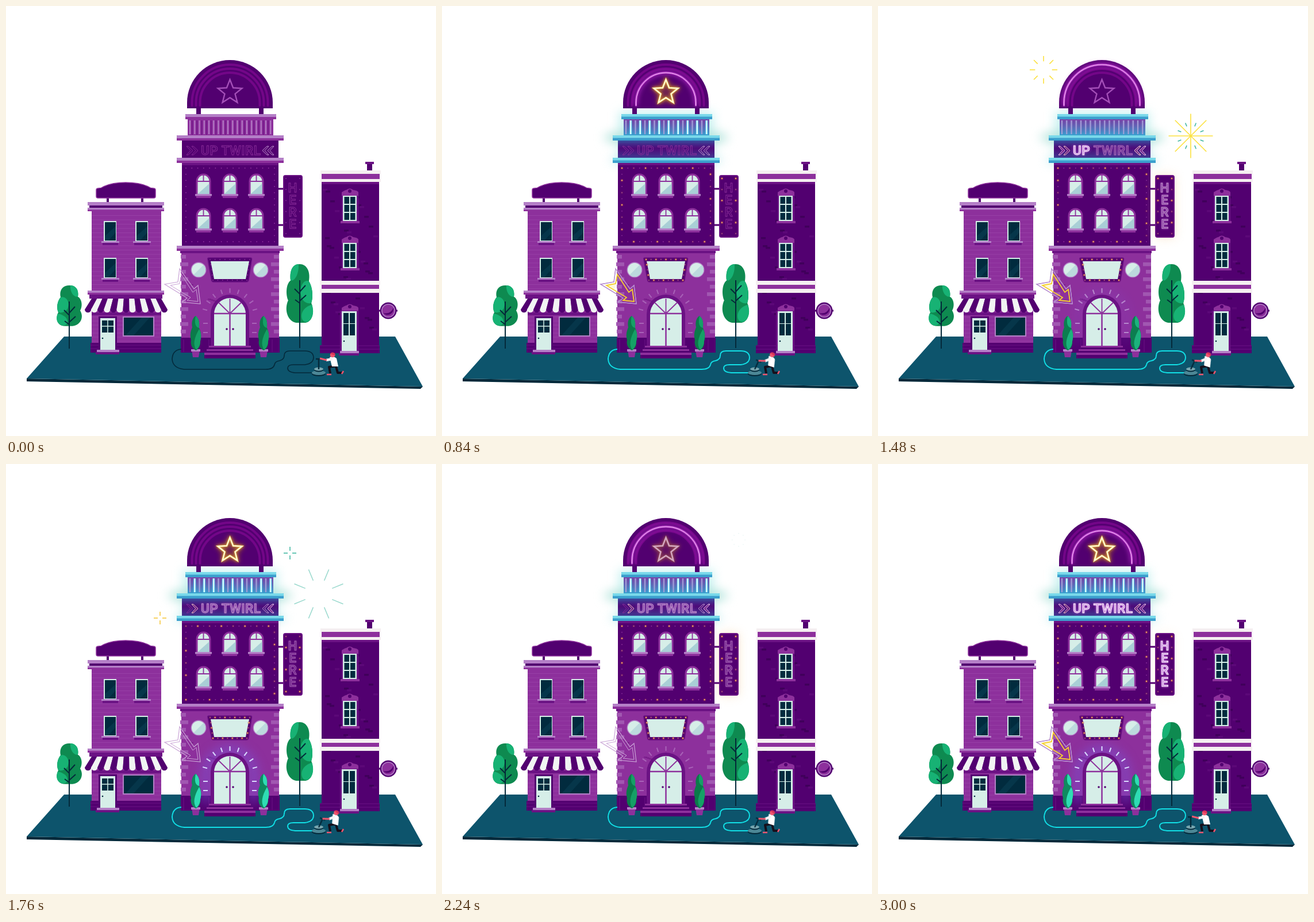
These frames come from a looping animation (748 by 748 pixels, 3040 ms). An HTML page:

```html
<!DOCTYPE html>
<html lang="en">
<head>
<meta charset="utf-8">
<title>Neon street</title>
<style>
html, body { margin: 0; width: 100%; height: 100%; overflow: hidden; background: #fff; }
svg { display: block; width: 100vw; height: 100vh; }
text { font: 500 22.5px Roboto, "Open Sans", sans-serif; letter-spacing: .5px; text-anchor: middle; fill: none; stroke: #8d309c; stroke-width: .9; }
.lit text { fill: #c98ade; stroke: #fff; stroke-width: 1; }
.pink { filter: drop-shadow(0 0 2px #b04fd0); }
.gold { filter: drop-shadow(0 0 2px #e0a83a) drop-shadow(0 0 4px #a8602a); }
.blur { filter: blur(9px); }
.soft { filter: blur(4px); }
.torso { transform-origin: 572px 627px; }
.arm { transform-origin: 568px 614px; }
.stick { transform-origin: 544px 632px; }
</style>
</head>
<body>
<svg id="stage" viewBox="0 0 748 748"></svg>
<script>
const LOOP = 3040;
const dark = '#520070', mid = '#6b1284', plum = '#8d309c', lilac = '#b47fc7',
      pale = '#d6eee8', cream = '#f5eff1', navy = '#012b3e', cyan = '#12dfe6', yellow = '#fbe13c', teal = '#43b8a3';

let css = '';
// Keyframes from [ms, value] stops; the loop cuts hard at its end.
function keys(name, prop, stops, ease = 'linear') {
  const all = [[0, stops[0][1]], ...stops, [LOOP, stops.at(-1)[1]]];
  const body = all.map(([t, v]) => `${(t / LOOP * 100).toFixed(3)}%{${prop}:${v}}`).join('');
  css += `@keyframes ${name}{${body}} .${name}{animation:${name} ${LOOP}ms ${ease} infinite}`;
}
const fade = (name, ...stops) => keys(name, 'opacity', stops);
const blink = (name, ...stops) => keys(name, 'opacity', stops, 'step-end');

const rep = (n, f) => Array.from({ length: n }, (_, i) => f(i)).join('');
const rect = (x, y, w, h, fill, more = '') => `<rect x="${x}" y="${y}" width="${w}" height="${h}" fill="${fill}" ${more}/>`;
const path = (d, fill, more = '') => `<path d="${d}" fill="${fill}" ${more}/>`;
const line = (d, stroke, w = 1, more = '') => `<path d="${d}" fill="none" stroke="${stroke}" stroke-width="${w}" ${more}/>`;
const dot = (x, y, r, fill, more = '') => `<circle cx="${x}" cy="${y}" r="${r}" fill="${fill}" ${more}/>`;
const oval = (x, y, rx, ry, fill) => `<ellipse cx="${x}" cy="${y}" rx="${rx}" ry="${ry}" fill="${fill}"/>`;
const g = (cls, inner, more = '') => `<g class="${cls}" ${more}>${inner}</g>`;
const move = (x, y, inner) => g('', inner, `transform="translate(${x} ${y})"`);
const ledge = (x, y, w, h) => rect(x, y, w, h, plum) + rect(x, y, w, h * .55, lilac, 'rx="1"');

// Timeline
fade('cyanOn', [640, 0], [760, 1]);
keys('cableOn', 'stroke-dashoffset', [[420, 1], [680, 0]]);
blink('bulbA', [680, 1], [1000, .35], [1280, 1], [1640, .35], [2120, 1]);
blink('bulbB', [680, .25], [1000, 1], [1280, .3], [1640, 1], [2120, .35], [2680, .3]);
fade('bulbs', [640, 0], [720, 1]);
blink('tubeA', [720, 1], [1080, 0], [1640, 1], [2000, 0], [2160, 1], [2400, 0], [2480, 1]);
blink('tubeB', [720, 0], [1080, 1], [1360, 0], [2000, 1], [2160, 0]);
fade('starOn', [640, 0], [740, 1], [1200, 1], [1320, 0], [1600, 0], [1700, 1], [1960, 1], [2060, 0], [2160, 0], [2320, 1], [2680, 1], [2740, .2], [2820, .2], [2900, 1]);
[760, 1030, 1300].forEach((t, i) =>
  fade('arc' + i, ...[0, 1080, 2160].filter(d => t + d < 3000).flatMap(d =>
    [[t + d, 0], [t + d + 60, 1], [t + d + 250, 1], [t + d + 310, 0]].filter(s => s[0] < LOOP))));
blink('arrowOn', [0, 0], [720, 1], [1040, 0], [1280, 1], [1640, 0], [2360, 1], [2720, 0], [2880, 1]);
fade('doorOn', [1380, 0], [1480, .3], [1600, 1], [1820, 1], [2080, 0], [2420, 0], [2520, .2], [2700, 1]);
fade('word0', [1280, 0], [1400, 1], [1520, 1], [1600, .5], [2360, .5], [2440, 1]);
fade('word1', [1440, 0], [1480, .3], [1600, .5], [2360, .5], [2440, 1]);
fade('hereOn', [1400, 0], [1480, .5], [1640, .5], [1720, .25], [2360, .3], [2460, 1]);
fade('hereGlow', [1280, 0], [1400, 1], [1600, 1], [1680, 0], [2100, 0], [2200, 1], [2640, 1], [2720, .4]);
blink('chevA', [0, 0], [1320, 1], [1640, 0], [2400, 1]);
blink('chevB', [0, 0], [1400, .9]);
const pose = (name, down, up) => keys(name, 'transform', [[360, up], [480, down], [2680, down], [2840, up]], 'ease-in-out');
pose('torso', 'rotate(18deg)', 'rotate(0deg)');
pose('arm', 'rotate(-30deg)', 'rotate(0deg)');
pose('stick', 'rotate(25deg) scaleY(.88)', 'rotate(0deg) scaleY(1)');

// Fireworks: each ray grows outwards, then its tail runs off.
let bursts = 0;
function burst(x, y, r0, r1, n, turn, color, stops, fadeFrom, fadeTo) {
  const id = bursts++;
  keys('ray' + id, 'stroke-dashoffset', stops);
  fade('out' + id, [fadeFrom, 1], [fadeTo, 0]);
  return move(x, y, g('out' + id, rep(n, i =>
    line(`M${r0} 0H${r1}`, color, 1.6, `class="ray${id}" pathLength="1" stroke-dasharray="1 2" stroke-dashoffset="1" transform="rotate(${turn + i * 360 / n})"`))));
}
function fireworks() {
  return burst(288, 111, 2, 24, 8, 0, yellow, [[1160, 1], [1320, 0], [1600, -1]], 1480, 1600)
    + burst(544, 226, 0, 38.5, 8, 0, yellow, [[1240, 1], [1460, 0], [1500, 0], [1700, -1]], 1580, 1720)
    + burst(544, 226, 18, 46, 8, 22.5, teal, [[1400, 1], [1480, .78], [1660, 0], [1760, -.25], [1880, -1]], 1640, 1900)
    + burst(494, 155, 3, 11, 4, 0, teal, [[1640, 1], [1740, 0], [1920, -1]], 1800, 1940)
    + burst(268, 268, 3, 11, 4, 0, '#f5c93f', [[1640, 1], [1740, 0], [1920, -1]], 1800, 1940)
    + burst(516, 132, 5, 12, 8, 0, teal, [[1880, 1], [2040, 0], [2300, -1]], 2080, 2260);
}

function ground() {
  return path('M36 648L725 662L721 666L36 653Z', '#04293a') + path('M101 575H677L725 662L36 648Z', '#0d546c');
}

function tree(x, y, sx, sy, foot) {
  const crown = 'M0 0C12 0 17 8 15 19C23 23 23 36 19 42C26 53 20 66 6 68H-6C-20 69-25 57-19 45C-23 37-20 25-15 20C-18 8-11 0 0 0Z';
  return g('', path(crown, '#0e8a50')
    + path('M-15 20C-7 17 1 26-2 36C-3 43-13 47-19 45C-23 37-20 25-15 20ZM-20 47C-10 49 0 55-4 64Q-8 69-15 66C-23 62-23 53-20 47ZM2 0C12 0 17 8 15 19C7 20 1 10 2 0Z', '#17b274'),
    `transform="translate(${x} ${y}) scale(${sx} ${sy})"`)
    + line(`M${x} ${y + 28}V${foot}M${x} ${y + 52}l-9-9M${x} ${y + 48}l10-11M${x} ${y + 64}l11-10M${x} ${y + 68}l-8-6`, '#04293a', 2);
}

function sash(x, y, w, h) {
  return rect(x, y, w, h, pale) + rect(x + 2, y + 2, w - 3, h - 3, navy)
    + path(`M${x + 2} ${y + h - 9}L${x + w - 1} ${y + 9}V${y + 20}L${x + 8} ${y + h - 1}H${x + 2}Z`, '#06364a');
}

function shop() {
  const win = (x, y) => sash(x, y, 22, 35) + rect(x - 4, y + 35, 31, 3, lilac) + rect(x - 2, y + 38, 27, 4, mid);
  const stripe = i => {
    const a = 149 + i * 121 / 13, b = a + 121 / 13, c = 137 + i * 144 / 13, d = c + 144 / 13;
    return path(`M${a} 509H${b}L${d} 528A5.54 5.5 0 0 1 ${c} 528Z`, i % 2 ? '#f1f4f3' : dark);
  };
  return rect(149, 350, 121, 253, plum)
    + rep(18, i => line(`M149 ${364.5 + i * 7.5}H270`, '#9a43a9', .8))
    + rect(142, 341, 133, 6, lilac) + rect(145, 347, 127, 4, dark) + ledge(142, 351, 133, 6)
    + rect(175, 333, 4, 8, dark) + rect(235, 333, 4, 8, dark)
    + path('M160 334Q157 334 157 331V320Q157 317 161 317Q166 317 170 314Q185 307 208 307Q232 307 247 314Q251 317 256 317Q260 317 260 320V331Q260 334 257 334Z', dark, `stroke="${plum}" stroke-width="1.5"`)
    + rep(4, i => win(170 + i % 2 * 55, i < 2 ? 374 : 438))
    + ledge(142, 495, 133, 7) + rect(145, 502, 127, 7, mid)
    + rep(7, i => line(`M149 ${541 + i * 7}H270`, '#9a43a9', .8))
    + rect(149, 533, 121, 5, mid) + rep(13, stripe)
    + rect(147, 586, 123, 17, dark) + line('M147 590H270M147 596H270', mid)
    + rect(161, 540, 32, 60, dark) + rect(164, 543, 26, 56, pale)
    + rect(167, 547, 20, 21, navy) + line('M177 547V568M167 557H187', pale, 1.5) + dot(168, 578, 1.3, navy)
    + rect(158, 598, 39, 4, lilac) + rect(156, 602, 41, 4, mid)
    + rect(203, 540, 55, 35, lilac) + rect(205, 542, 51, 31, navy) + path('M208 573L236 542H250L222 573Z', '#06364a');
}

function rightHouse() {
  const crest = y => path(`M584 ${y + 12}V${y + 6}Q590 ${y + 2} 592 ${y + 2}Q598 ${y - 3} 604 ${y + 2}Q612 ${y + 3} 613 ${y + 6}V${y + 12}Z`, plum) + dot(598, y + 4, 3, dark);
  const win = y => crest(y - 12) + rect(584, y, 29, 45, mid) + rect(586, y, 24, 44, pale) + rect(588.5, y + 2, 19, 40, navy)
    + line(`M598 ${y}V${y + 44}M587 ${y + 15}H610M587 ${y + 29}H610`, pale, 2) + rect(582, y + 44, 33, 4, plum);
  const brick = i => rect(551 + i * 37 % 89, 318 + Math.floor(i * 71 % 257), 8, 3.5, i % 3 ? '#40005b' : '#5c0878');
  return rect(628, 273, 9, 14, dark) + rect(625, 271, 15, 4, mid)
    + rect(549, 290, 100, 314, dark) + rep(44, brick)
    + rect(547, 286, 105, 6, cream) + rect(549, 292, 101, 9, plum) + rect(547, 301, 105, 5, cream) + rect(549, 306, 100, 4, mid)
    + win(330) + win(412)
    + rect(546, 478, 105, 7, cream) + rect(549, 485, 100, 7, plum) + rect(546, 492, 105, 7, cream)
    + rect(546, 590, 104, 14, dark) + line('M546 591H650M546 597H650', mid, 1.2)
    + crest(519) + rect(581, 530, 32, 73, mid) + rect(584, 531, 26, 72, pale) + rect(587, 534, 20, 18, navy) + rect(587, 553, 20, 20, navy)
    + line('M597 532V574', pale, 2) + dot(588, 583, 1.3, navy) + rect(581, 600, 33, 4, lilac) + rect(579, 604, 35, 4, mid)
    + line('M648 530H681', dark, 3) + dot(665, 530, 14.5, dark) + dot(665, 530, 12, lilac) + dot(665, 530, 10.5, plum)
    + path('M656 534A10.5 10.5 0 0 0 674 525Q669 537 656 534Z', dark);
}

const star = [...Array(10)].map((_, i) => {
  const a = (i * 36 - 90) * Math.PI / 180, r = i % 2 ? 9.5 : 22;
  return `${(389.5 + r * Math.cos(a)).toFixed(1)} ${(150 + r * Math.sin(a)).toFixed(1)}`;
}).join('L');

function dome() {
  const arc = i => `M${337.5 - i * 7} 173V168A${52 + i * 7} ${52 + i * 7} 0 0 1 ${441.5 + i * 7} 168V173`;
  return rect(331, 176, 8, 13, dark) + rect(440, 176, 8, 13, dark)
    + path('M315 178V168A74.5 74 0 0 1 464 168V178Z', dark)
    + rep(3, i => line(arc(i), '#730688', 4, 'stroke-linecap="round"'))
    + rep(3, i => g('arc' + i, line(arc(i), '#b52ac8', 5, 'class="soft"') + line(arc(i), '#c653d6', 3, 'stroke-linecap="round"') + line(arc(i), '#efb4f2', 1)))
    + line(`M${star}Z`, '#a44fb8', 2.4)
    + g('starOn', dot(389.5, 150, 18, '#8a4030', 'class="soft" opacity=".4"') + g('gold', line(`M${star}Z`, '#ffe27a', 3) + line(`M${star}Z`, '#fffbe6', 1.6)));
}

function crown() {
  const tube = (i, c, w) => line(`M${320 + i * 8.25} 199V223`, c, w);
  const tops = [[312, 188, 158, 9], [297, 225, 186, 9], [297, 264, 186, 9]];
  return rect(316, 196, 149, 30, plum) + rep(18, i => tube(i, lilac, 2)) + rep(17, i => line(`M${324 + i * 8.25} 199V224`, mid, 1.4))
    + tops.map(t => ledge(...t)).join('') + rect(306, 234, 168, 30, dark)
    + g('cyanOn', rect(316, 197, 149, 28, 'url(#wash)') + rect(306, 234, 168, 30, 'url(#dim)')
      + rep(18, i => tube(i, '#a59fd8', 2))
      + tops.map(([x, y, w, h]) => rect(x, y, w, h, '#3b9fcd') + rect(x, y, w, h * .5, '#79d9ea', 'rx="1"')).join('')
      + g('tubeA', rep(9, i => tube(i * 2 + 1, '#4fd3ee', 4) + tube(i * 2 + 1, '#f2ffff', 2)))
      + g('tubeB', rep(9, i => tube(i * 2, '#4fd3ee', 3) + tube(i * 2, '#e6fbff', 1.5))));
}

function neonSign() {
  const words = [['UP', 354], ['TWIRL', 409]];
  const label = ([s, x]) => `<text x="${x}" y="259">${s}</text>`;
  const chev = (k, c, fill) => path(`M${314 + k * 9} 244h3l8 7.5l-8 7.5h-3l7-7.5Z`, fill, `stroke="${c}" stroke-width=".9"`);
  const side = (off, a, b) => chev(0, off, 'none') + chev(1, off, 'none')
    + g(a, chev(0, '#f3dcf7', '#6b1284')) + g(b, chev(1, '#fff3cf', '#6b1284'));
  return words.map(label).join('') + words.map((w, i) => g(`lit word${i}`, g('pink', label(w)))).join('')
    + side('#8d309c', 'chevA', 'chevB') + g('', side('#cda6da', 'chevB', 'chevA'), 'transform="translate(780 0) scale(-1 1)"');
}

// Bulbs alternate between two blinking sets, with unlit ones between.
function lamps(points, step = 4) {
  const set = k => points.filter((_, i) => i % step === k).map(([x, y]) =>
    dot(x, y, 2.6, '#c8503a', 'opacity=".3"') + dot(x, y, 1.2, '#f0a868')).join('');
  return points.map(([x, y]) => dot(x, y, .9, '#8d309c')).join('') + g('bulbs', g('bulbA', set(0)) + g('bulbB', set(step / 2)));
}
const run = (n, x0, y0, x1, y1) => [...Array(n)].map((_, i) => [x0 + (x1 - x0) * i / n, y0 + (y1 - y0) * i / n]);

function hall() {
  const glass = 'M-11.5 37V12A11.5 12 0 0 1 11.5 12V37Z';
  const win = i => move(343.5 + i % 3 * 46, i < 3 ? 293 : 353,
    path(glass, pale, `stroke="${plum}" stroke-width="3"`) + path('M-10 34L10 16V36H-10Z', '#a9cfd6')
    + line('M-11 12H11M0 1V12', plum, 1.8) + rect(-14.5, 34, 29, 3.5, lilac) + rect(-12.5, 37.5, 25, 3.5, plum));
  return rect(306, 273, 168, 145, dark) + rect(306, 273, 168, 4, mid)
    + lamps([...run(15, 313, 282, 467, 282), ...run(12, 467, 282, 467, 410), ...run(15, 467, 410, 313, 410), ...run(12, 313, 410, 313, 282)])
    + rep(6, win);
}

function sideSign() {
  const letters = [...'HERE'].map((c, i) => `<text x="498.8" y="${323.5 + i * 21.2}">${c}</text>`).join('');
  return g('hereGlow', rect(482, 294, 34, 109, '#f5c98a', 'class="blur" opacity=".4"'))
    + line('M474 318H484M474 381H484', dark, 3)
    + rect(483, 295, 32, 107, dark, `rx="3" stroke="${mid}" stroke-width="2"`)
    + lamps([...run(6, 487, 300, 487, 415), ...run(6, 511, 300, 511, 415)].filter(p => p[1] < 400), 2)
    + letters + g('lit hereOn', g('pink', letters));
}

function entrance() {
  const rays = (c, w) => rep(9, i => line('M0-41V-49', c, w, `transform="translate(389.5 540) rotate(${(i - 4) * 18.7})"`))
    + line('M343 552h8M343 568h8M428 552h8M428 568h8', c, w);
  const leaf = (x, a, b) => path(`M${x} 539C${x + 8} 546 ${x + 6} 555 ${x + 6} 560C${x + 11} 570 ${x + 9} 579 ${x + 8} 583C${x + 9} 592 ${x + 4} 598 ${x} 599C${x - 9} 594 ${x - 9} 586 ${x - 8} 581C${x - 11} 571 ${x - 8} 564 ${x - 6} 559C${x - 8} 549 ${x - 5} 542 ${x} 539Z`, a)
    + path(`M${x} 539C${x + 8} 546 ${x + 6} 555 ${x + 6} 560Q${x - 4} 558 ${x} 539ZM${x + 6} 562C${x + 11} 570 ${x + 9} 579 ${x + 8} 583Q${x + 8} 592 ${x + 1} 598Q${x - 8} 586 ${x + 6} 562Z`, b);
  const pot = x => path(`M${x - 7} 599H${x + 7}L${x + 5} 611H${x - 5}Z`, plum) + rect(x - 8, 597, 16, 4, lilac);
  const round = x => dot(x, 459, 13.5, lilac) + dot(x, 459, 12, pale) + path(`M${x - 8.5} 467.5L${x + 8.5} 450.5A12 12 0 0 1 ${x - 8.5} 467.5Z`, '#bcdadd');
  return rect(305, 425, 170, 178, plum)
    + rep(11, i => rect(304 - i % 2, 433 + i * 13, 9 + i % 2 * 5, 6.5, '#a157b1') + rect(466 - i % 2 * 5, 433 + i * 13, 9 + i % 2 * 5, 6.5, '#a157b1'))
    + rep(14, i => rect(320 + i * 43 % 132, 484 + i * 29 % 88, 6, 2, '#7b1f8c'))
    + rect(304, 577, 172, 26, dark) + rep(8, i => line(`M${309 + i * 22} 580V602`, mid))
    + ledge(297, 417, 186, 9) + rect(303, 426, 173, 4, mid)
    + round(335) + round(443)
    + path('M353 438H425Q428 438 427.5 441L422 477Q421 480 418 480H361Q358 480 357.5 477L351 441Q350 438 353 438Z', dark, `stroke="${mid}" stroke-width="1.5"`)
    + path('M356 444H423L417 475H362Z', pale)
    + lamps([...run(8, 355, 441, 424, 441), ...run(4, 424, 441, 419, 477), ...run(7, 419, 477, 360, 477), ...run(4, 360, 477, 355, 441)], 2)
    + rays('#a862b8', 2)
    + g('doorOn', line('M348 590V540A41.5 42 0 0 1 431 540V590', '#7a55d8', 18, 'class="blur" opacity=".5"') + rays('#d9d9ff', 2))
    + path('M356 592V536A33.5 34 0 0 1 423 536V592Z', mid)
    + path('M362 592V536A27.5 28 0 0 1 417 536V592Z', pale)
    + line('M362 535H417M389.5 535V592', plum, 2.5) + line('M389.5 535V509M389.5 535L370 516M389.5 535L409 516', plum, 1.8)
    + dot(384, 562, 1.8, dark) + dot(395, 562, 1.8, dark)
    + rect(353, 591, 73, 5, plum) + rect(353, 594, 73, 3, dark) + rect(349, 597, 81, 5, plum) + rect(349, 600, 81, 3, dark) + rect(345, 603, 89, 5, plum) + rect(345, 607, 89, 6, dark)
    + [330, 448].map(x => pot(x) + leaf(x, '#0b7a4a', '#15a066') + g('doorOn', leaf(x, '#0f8a60', '#2fdcb4'))).join('');
}

function arrow() {
  const outer = 'M276 484L299 480L302 457L327 492L334 486L338 518L306 515L315 508Z';
  const inner = 'M286 486L302 483L305 467L325 498L331 493L334 514L315 512L321 507Z';
  return line(outer, '#c9a3d6', 1.2) + line(inner, '#c9a3d6', 1)
    + g('arrowOn', line(outer, '#b48bd0', 1.4) + path('M286 486L302 483L300 495Z', '#fff6d0', 'opacity=".8"') + line(inner, '#f5cf2e', 1.8));
}

function wire() {
  const d = 'M533 638H503Q490 637 490 630Q490 624 500 624H520Q535 622 535 611Q534 600 520 600H494Q484 600 484 608Q484 615 476 617Q468 618 467 624Q465 632 452 632H310Q290 630 289 614Q290 598 305 597';
  return line(d, '#04293a', 1.6) + line(d, cyan, 2, 'class="cableOn" pathLength="1" stroke-dasharray="1 2" stroke-dashoffset="1"');
}

function worker() {
  const skin = '#f0566f', ink = '#15101c';
  return oval(544, 640, 12, 4, '#04293a') + oval(544, 638, 12, 4, '#4c8796') + oval(544, 633, 8, 3.5, '#04293a') + oval(544, 631.5, 8, 3, '#77a6b0')
    + g('stick', line('M544 632V614M539 614H549', '#04293a', 2.4))
    + line('M575 626L562 628L564 639M574 627L577 638L586 638', ink, 4, 'stroke-linejoin="round"')
    + line('M558 641H566M584 640L587 635', skin, 2.5)
    + g('torso', path('M563 611Q570 608 575 613L578 627H567Z', '#fff') + dot(568, 607, 4.3, skin) + path('M564 605Q567 601 572 604L573 608Z', '#d93358')
      + g('arm', line('M568 614L557 616', '#f4f4f6', 4.5) + line('M558 616L546 613', skin, 3)));
}

const defs = `<defs>
  <linearGradient id="wash" x2="0" y2="1"><stop stop-color="#7058b4" stop-opacity=".6"/><stop offset="1" stop-color="#35a8d2" stop-opacity=".95"/></linearGradient>
  <linearGradient id="dim" x2="0" y2="1"><stop stop-color="#2f72b4" stop-opacity=".7"/><stop offset=".45" stop-color="#44208c" stop-opacity=".35"/><stop offset="1" stop-color="#2f72b4" stop-opacity=".5"/></linearGradient>
</defs>`;
const halo = g('cyanOn', g('blur', rect(308, 184, 164, 92, '#8fe3e2', 'opacity=".5"') + oval(390, 229, 108, 16, '#b4e4dc') + oval(390, 268, 98, 10, '#b8e8ea')));

document.getElementById('stage').innerHTML = defs + ground() + tree(110, 486, 1, 1.04, 596) + shop()
  + halo + dome() + crown() + neonSign() + hall() + sideSign() + entrance() + arrow()
  + tree(511, 449, -1.06, 1.5, 595) + rightHouse() + wire() + worker() + fireworks();
document.head.append(Object.assign(document.createElement('style'), { textContent: css }));
</script>
</body>
</html>
```
